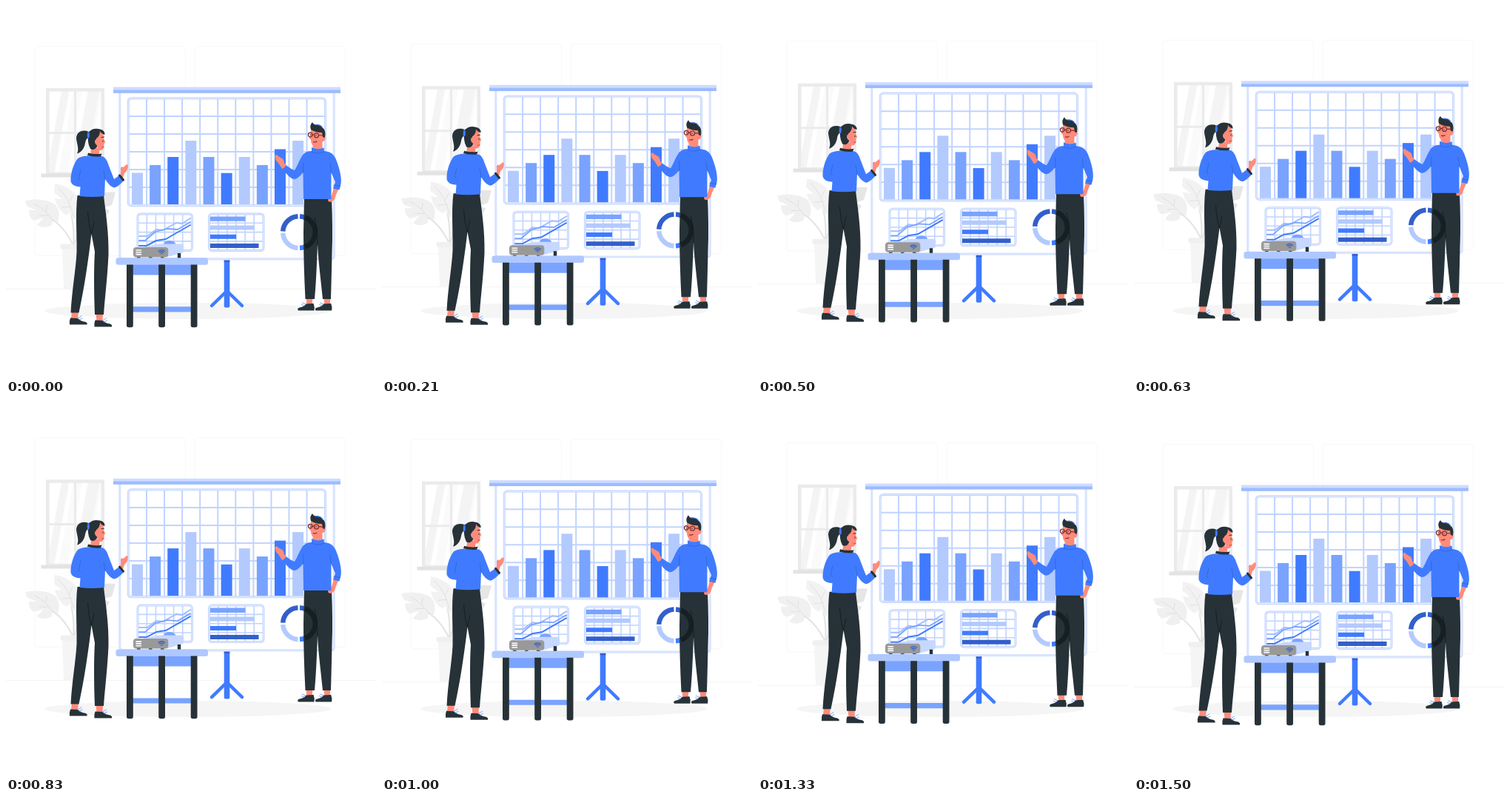
Recreate the animation shown at these times as an HTML page. Size 500x500 px, loop 1540 ms.

```html
<!DOCTYPE html>
<html lang="en">
<head>
<meta charset="utf-8">
<title>Presentation</title>
<style>
  html, body { margin: 0; height: 100%; overflow: hidden; background: #fff; }
  svg { display: block; width: 100vw; height: 100vh; }
  .blue { fill: #407bff; } .mid { fill: #79a3ff; } .light { fill: #b3caff; } .deep { fill: #335fcb; }
  .dark { fill: #263238; } .skin { fill: #ff8b7b; } .pale { fill: #ebebeb; }
  .line { fill: none; stroke-linecap: round; stroke-linejoin: round; }
</style>
</head>
<body>
<svg viewBox="0 0 500 500">
  <ellipse cx="245.5" cy="412" rx="193.5" ry="11" fill="#f5f5f5"/>
  <g id="scene">
    <g fill="none" stroke="#f8f8f8">
      <rect x="39" y="54.5" width="203.5" height="283" rx="4"/>
      <rect x="255" y="54.5" width="203.5" height="283" rx="4"/>
      <path d="M0 382.5H500" stroke="#f3f3f3"/>
    </g>

    <g id="window">
      <path fill="#fafafa" d="M58 115H129V227H58Z"/>
      <path fill="#fff" d="M59 115H75L59 205ZM86 115H91L71 227H65ZM103 115H110L90 227H83ZM128 125V200L122 227H108Z"/>
      <path fill="#f3f3f3" d="M75 115H85L65 227H59V205ZM111 115H126L106 227H91Z" opacity=".7"/>
      <path class="line" stroke="#ebebeb" stroke-width="4.5" style="stroke-linecap:butt;stroke-linejoin:miter" d="M56.2 113.3H130.8V227H56.2Z"/>
      <path class="pale" d="M92 115H95V227H92ZM58 170H129V173H58Z"/>
      <path fill="#e3e3e3" d="M47.5 226.5H140V231.5H47.5Z"/>
    </g>

    <g id="plant">
      <path class="line" stroke="#e3e3e3" stroke-width="2" d="M91 324C82 304 70 292 56 284M91 324C93 300 90 280 80 258M92 324C98 300 110 275 138 262"/>
      <path fill="#f0f0f0" d="M26 263C40 260 58 261 67 269C73 276 72 285 70 292L63 287L62 296C55 300 47 300 42 296L51 286L38 290C32 287 31 281 31 276L42 276L29 271Z"/>
      <path fill="#f2f2f2" d="M66 240C80 242 94 250 98 262C100 274 97 284 91 289L86 279L82 283C74 279 68 270 66 260L76 261L65 252Z"/>
      <path fill="#e6e6e6" d="M148 252C134 250 118 254 109 264C103 273 105 283 109 289L117 282L120 292C130 290 137 285 140 276L130 273L143 269Z"/>
      <path class="line" stroke="#e0e0e0" d="M38 267Q55 276 64 291M55 269L54 277M45 283L57 283M71 246Q86 260 91 284M90 256L86 264M76 272L88 271"/>
      <path fill="#f5f5f5" d="M76 326H102L98 382H78Z"/>
      <rect x="73.500" y="321.500" width="30" height="7" rx="2" fill="#f0f0f0"/>
    </g>

    <g id="stand">
      <path class="line" stroke="#407bff" stroke-width="4.500" d="M278 405L298.500 385L319 405"/>
      <rect class="blue" x="294.700" y="342" width="7.600" height="65.500" rx="2"/>
      <path class="deep" d="M294.700 343H302.300V346H294.700Z"/>
    </g>

    <g id="board">
      <path fill="#fff" stroke="#d9e4ff" stroke-width="3.200" d="M153.800 116V338Q153.800 341.800 158 341.800H439Q443.200 341.800 443.200 338V116"/>
      <path fill="#cddcff" d="M145 109.600H452V114H145Z"/>
      <path fill="#9dbbff" d="M145 113.500H452V117.700H145Z"/>
      <g id="charts"></g>
      <path class="line" stroke="#a3bfff" stroke-width="2" d="M180 311H191L203 302L212 303L230 293L238 294L249 287"/>
      <path class="line" stroke="#79a3ff" stroke-width="1.800" d="M180 317H188L202 305L218 301L232 302L249 292"/>
      <path class="line" stroke="#407bff" stroke-width="2" d="M180 324H190L203 317L216 315L235 304L249 296"/>
      <path class="mid" d="M212 324Q213 317 221 317Q229 317 230 324Z"/>
      <path class="mid" d="M276 284.500H323.500V290.800H276Z"/>
      <path class="light" d="M276 296.500H335.500V302.500H276Z"/>
      <path class="blue" d="M276 308.800H311V314.800H276Z"/>
      <path class="deep" d="M276 321H341.500V327H276Z"/>
      <g fill="none" stroke-width="6.500">
        <path stroke="#335fcb" d="M374.200 304.500A21.500 21.500 0 0 1 394.500 284.200M397 284.200A21.500 21.500 0 0 1 417 304.500"/>
        <path stroke="#b3caff" d="M374.200 307A21.500 21.500 0 0 0 394.500 327"/>
        <path stroke="#407bff" d="M397 327A21.500 21.500 0 0 0 417 307"/>
      </g>
    </g>

    <g id="projector">
      <path fill="#c6d8ff" d="M180 327L206 321.500H238Q240 321.500 240 324V331Q240 333 238 333.500L217 339.500Z"/>
      <path class="dark" d="M231.800 334H236.200V341H231.800ZM177 339H181.500V341.500H177ZM193 339H197.500V341.500H193ZM209 339H213.500V341.500H209Z"/>
      <rect x="172" y="326" width="47.300" height="13.500" rx="4" fill="#999"/>
      <path class="line" stroke="#fff" stroke-width="1.600" d="M176 330H182.500M176 332.800H182.500M176 335.600H182.500"/>
      <path class="line" stroke="#335fcb" stroke-width="1.300" d="M206 331.300Q210.300 328 214.600 331.300M207.700 333Q210.300 331 213 333M209.500 334.700H211.200"/>
    </g>

    <g id="table">
      <path class="mid" d="M171 349H250V363.500H171ZM171 406.300H250V413.500H171Z"/>
      <rect x="148.500" y="340.300" width="124.500" height="9.500" rx="3" fill="#afc8ff"/>
      <path class="dark" d="M163 349.500h8.800v82q0 2.700-2.500 2.700h-3.800q-2.500 0-2.500-2.700zM206.200 349.500h8.800v82q0 2.700-2.500 2.700h-3.800q-2.500 0-2.500-2.700zM249.700 349.500h8.800v82q0 2.700-2.500 2.700h-3.800q-2.500 0-2.500-2.700z"/>
    </g>

    <g id="woman">
      <path class="skin" d="M89 412H98L97 423H88ZM121.500 415H131L130.500 426H122.500Z"/>
      <path class="dark" d="M87 421.500L97 422Q101 426 107 426.700Q110.500 428 109.500 430.500H86Q85.500 425 87 421.500ZM120.500 424.500L130.500 425Q135 429 140.500 429.500Q144 431 143 433.500H119.500Q119 428 120.500 424.500Z"/>
      <path class="line" stroke="#79a3ff" d="M97 422L102 419M99 424L103 422M130.500 425L135.500 422M132.500 427L136.500 425"/>
      <path class="dark" d="M96.500 256H132C135 282 139 306 138.500 336C137 368 133.500 395 132 417H120C119 388 118.500 358 120 332L115.500 308C111 345 106 380 98.500 414.500H87.500C89 385 94.500 355 95.500 333C96 308 93.500 280 96.500 256Z"/>
      <path class="line" stroke="#11191d" stroke-width=".8" d="M110.500 278Q112 298 115.500 308L119 292"/>
      <path class="skin" d="M153 230C156 227 155 223 155 219Q156 216 158.500 218L163 214Q165.500 214 164.500 219Q163 224 160 226L157.500 234Z"/>
      <path class="blue" d="M109 202.500L129 203C135 204 137 210 139 216L146 234L153 229L159.500 235.500Q151 245 146 245.500Q140 244 134 234L133 257Q116 259 99.500 257L100.500 244.500Q89 244 87.500 237C87 225 92 212 97 206Q101 203 109 202.500Z"/>
      <path class="line" stroke="#2f62d8" stroke-width=".8" d="M101 221L98 234L101 235M134 234L132 222"/>
      <path class="line" stroke="#263238" stroke-width="3" d="M153.500 229L158.500 235"/>
      <path class="skin" d="M116 184L127 187L126 201H114Z"/>
      <path class="dark" d="M111 198.500Q120 201 129.500 199.500L128 203.500Q118 204 110 202Z"/>
      <path class="skin" d="M119 171Q126 166 131.500 172L132 179L134.200 184L132.500 186L132.300 191Q131 196 125 195Q117 192 116 183Z"/>
      <path class="dark" d="M112 170Q118 164 127 166.500Q134 168 133.500 174Q128 172 127 169Q127 176 122 179L123 190Q119 196 114 193Q109 184 112 170Z"/>
      <path class="dark" d="M112 170C102 166 95 171 95 179C96 188 99 193 96 199.500C102 198 106 192 107 185Q108 179 112 177Z"/>
      <path class="blue" d="M110.500 169Q114 171 112.500 178L110 180Q109 174 110.500 169Z"/>
      <path class="skin" d="M126 181Q120 178 120 184Q121 189 125.500 188Z"/>
      <path class="line" stroke="#263238" stroke-width="1" d="M129 177.500L132.500 177M131 182V183.300"/>
      <path class="line" stroke="#b3493f" stroke-width=".8" d="M129 191L132 190.500"/>
      <circle cx="123.500" cy="191" r="1" fill="#b3caff"/>
    </g>

    <g id="man">
      <path class="skin" d="M405.500 394H414.500L413.500 405H406.500ZM429.500 394H438.500L437.500 405H430.500Z"/>
      <path id="shoe" class="dark" d="M405.500 402.500L415.500 402Q417.500 407 416.500 411.500H395Q393 409 396 407.700Q402 407 405.500 402.500Z"/>
      <use href="#shoe" x="23.700"/>
      <path class="line" stroke="#79a3ff" d="M405 403L400.500 401M403 405L399.500 403.500M429 403L424.500 401M427 405L423.500 403.500"/>
      <path class="dark" d="M403 260H440C441 285 441.500 310 440.500 335C440 358 439.500 378 439 396H428C425.500 370 422 345 421 322C420 350 419 375 417 396H404.500C403 365 402 335 402 306Z"/>
      <path fill="none" stroke="#161f24" stroke-width="6.500" d="M404 285.500A21.500 21.500 0 0 1 404 325.700"/>
      <path class="line" stroke="#11191d" stroke-width=".8" d="M421 322Q421 300 417 286"/>
      <path class="skin" d="M373 220L368 212Q363 208 363.500 202.500Q365 199.500 368 203L374 206.500Q376 209 375.500 211L379.500 217ZM443 246L450 246Q446 254 444 261Q440 266.500 435.500 264Q434 259 440 256Z"/>
      <path class="blue" d="M413 191Q421 194 429.500 191.500L430 196C440 197 444 201 447 210C451 221 454 232 452.500 241L450.500 248.500L442 246.500L445 238L439.500 225L439.500 261H402L401.500 225C396 231 393 234 389 234Q383 233 374.500 221L378.500 215Q386 221 390 222C394 216 397 206 402 200Q406 196 413 196Z"/>
      <path class="line" stroke="#2f62d8" stroke-width=".8" d="M413 197Q421 201 430 197M401.500 225L402 212M439.500 225L438 213M443 242L451.500 243.500"/>
      <path class="skin" d="M415 182H427.500L427.500 192Q421 195 414.500 191Z"/>
      <path class="skin" d="M412 167Q420 162 428 168L429 177Q433 177 431 181Q429 184 427 183Q424 190 417 189.500Q412 188 412 181L409.500 178L411.500 174Z"/>
      <path class="dark" d="M412 167Q410 161 414 157Q415 160 418 160.500Q425 160 427 164Q433 167 431 178L428 177L427 171Q418 171 412 167Z"/>
      <path class="line" stroke="#407bff" stroke-width="1.200" d="M418 160.500Q425 160 427.500 164"/>
      <g class="line" stroke="#7b2f2c" stroke-width="1.200">
        <circle cx="411.200" cy="174" r="2.800"/>
        <circle cx="419.500" cy="174.800" r="3"/>
        <path d="M414 174H416.500M422.500 174.500L428.500 175M415.500 183.500Q418 184.500 420 183"/>
      </g>
      <path class="dark" d="M411.200 173.500h1v1.600h-1zM418.500 174h1v1.600h-1z"/>
    </g>
  </g>
</svg>
<script>
const range = (count, start, step) => Array.from({ length: count }, (_, i) => start + i * step);

function panel(x, y, w, h, cols, rows, colStart, rowStart, colStep, rowStep, line) {
  const grid = range(cols, colStart, colStep).map(v => `M${v} ${y}v${h}`)
    .concat(range(rows, rowStart, rowStep).map(v => `M${x} ${v}h${w}`)).join('');
  const frame = (color, width) =>
    `<rect x="${x}" y="${y}" width="${w}" height="${h}" rx="4" stroke="${color}" stroke-width="${width}"/>`;
  return `<g fill="none"><path d="${grid}" stroke="#c1d4ff" stroke-width="${line}"/>`
    + frame('#bdd1ff', 3) + frame('#e6eeff', 1.2) + '</g>';
}

const barTops = [225.5, 215, 204, 182, 204, 225.7, 204, 215, 193.5, 182];
const shades = ['light', 'mid', 'blue'];
const bars = barTops.map((top, i) =>
  `<rect class="${shades[i % 3]}" x="${170 + i * 24.12}" y="${top}" width="15" height="${268 - top}"/>`).join('');

document.getElementById('charts').innerHTML =
  panel(165.2, 124.7, 266.2, 145, 10, 5, 190, 149, 24.06, 24, 2) + bars
  + panel(178, 281, 73.5, 49.5, 5, 3, 190.3, 293.3, 12.1, 12.3, 1.6)
  + panel(274.5, 281, 73.5, 49.5, 5, 3, 286.8, 293.3, 12.1, 12.3, 1.6);

// The scene floats 10 units up and back at a constant speed, in 24 steps per second.
const LOOP = 1540, CYCLE = 1500, LIFT = 10, RATE = 24 / 1000;
const scene = document.getElementById('scene');

function draw(now) {
  const time = Math.floor((now % LOOP + 5) * RATE) / RATE % CYCLE;
  const lift = LIFT * (1 - Math.abs(1 - time / (CYCLE / 2)));
  scene.setAttribute('transform', `translate(0 ${-lift})`);
  requestAnimationFrame(draw);
}
draw(performance.now());
</script>
</body>
</html>
```
